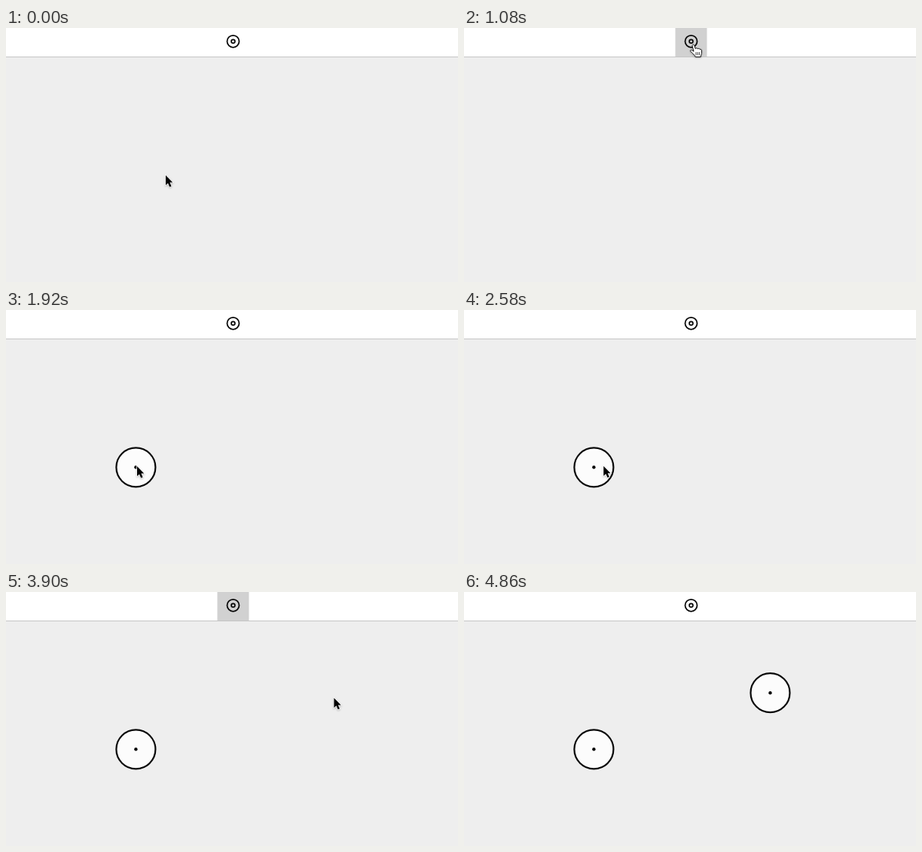
Write an HTML page that moves like this. It is 600 px wide and 338 px high and loops after 5920 ms.

```html
<!DOCTYPE html>
<html lang="en">
<head>
<meta charset="utf-8">
<title>Placing circles</title>
<style>
  html, body { margin: 0; width: 100%; height: 100%; overflow: hidden; background: #eee; }
  svg { display: block; width: 100%; height: 100%; }
  #cursor { filter: drop-shadow(0 1px 1px rgba(0, 0, 0, .25)); }
</style>
</head>
<body>
<svg viewBox="0 0 600 338">
  <defs>
    <g id="node">
      <circle r="26" fill="#fcfcfc" stroke="#0a0a0a" stroke-width="2.2"/>
      <circle r="2.2" fill="#0a0a0a"/>
    </g>
  </defs>
  <rect width="600" height="338" fill="#eee"/>
  <rect width="600" height="38" fill="#fff"/>
  <rect id="button" x="280.5" width="42" height="38"/>
  <rect y="38" width="600" height="1" fill="#c4c4c4"/>
  <g fill="none" stroke="#0a0a0a" stroke-width="1.8">
    <circle cx="301.5" cy="17.8" r="8"/>
    <circle cx="301.5" cy="17.8" r="2.4"/>
  </g>
  <use id="first" href="#node" x="172.4" y="209.3"/>
  <use id="second" href="#node" x="406.5" y="134.2"/>
  <g id="cursor">
    <path id="arrow" fill="#000" stroke="#fff" stroke-width="1.4" paint-order="stroke"
      d="M0 0V13L3 10.4L5.2 15.4L7.6 14.4L5.4 9.5H9.3Z"/>
    <g id="hand" stroke="#111" stroke-linejoin="round" stroke-linecap="round">
      <path fill="#fff" d="M-1 1.6C-1.2-.2 1.2-.6 1.8 1.2L3.2 5.6C4.2 4.2 5.8 4.4 6.2 5.8C7.2 4.8 8.7 5.2 9 6.4C10.3 5.8 11.4 6.6 11.4 8V11.4C11.4 13 10.3 13.7 10.2 16.5H3.2C2.8 14-.6 12.3-3.4 8.9C-4.2 7.5-2.4 6.6-1.1 7.7L.7 9Z"/>
      <path fill="none" stroke-width=".8" d="M4 10.5V13.8M6.2 10.5V13.8M8.4 10.5V13.8"/>
    </g>
  </g>
</svg>
<script>
const LOOP = 5920, STEP = 20;
const el = id => document.getElementById(id);
const show = (id, on) => el(id).setAttribute('visibility', on ? 'visible' : 'hidden');

// Each cursor move is an eased sweep along one curve.
function sweep(start, end, d) {
  const path = document.createElementNS('http://www.w3.org/2000/svg', 'path');
  path.setAttribute('d', d);
  const [x0, y0, x1, y1, x2, y2, x3, y3] = d.match(/[\d.]+/g).map(Number);
  const cubic = (a, b, c, e, s) =>
    a * (1 - s) ** 3 + 3 * b * s * (1 - s) ** 2 + 3 * c * s * s * (1 - s) + e * s ** 3;
  return {
    start,
    at(t) {
      const s = ease(Math.min(1, Math.max(0, (t - start) / (end - start))));
      return [cubic(x0, x1, x2, x3, s), cubic(y0, y1, y2, y3, s)];
    }
  };
}

// Quick start, long settling.
function ease(u) {
  const v = u ** 0.7;
  return v * v * (3 - 2 * v);
}

const toButton = sweep(260, 820, 'M212 196 C290 190 380 36 304 22');
const moves = [
  toButton,
  sweep(1360, 1760, 'M304 22 C345 260 163 265 174 208'),
  sweep(2560, 3040, 'M174 208 C290 210 395 60 303 22'),
  sweep(3560, 4060, 'M303 22 C290 20 516 178 408 133'),
  sweep(4600, 4860, 'M408 133 C440 150 530 200 612 188')
];

function draw(now) {
  const t = Math.floor(now % LOOP / STEP) * STEP;
  const move = moves.findLast(m => m.start <= t) || toButton;
  const [x, y] = move.at(t);
  const over = x > 280 && x < 323 && y < 39;
  const active = t >= 1080 && t < 1920 || t >= 3300 && t < 4220;

  el('button').setAttribute('fill', active ? '#d1d1d1' : over ? '#dedede' : '#fff');
  el('cursor').setAttribute('transform', `translate(${x} ${y})`);
  show('arrow', !over && t < 4860);
  show('hand', over);
  show('first', t >= 1920);
  show('second', t >= 4220);
  requestAnimationFrame(() => draw(performance.now()));
}
draw(0);
</script>
</body>
</html>
```
